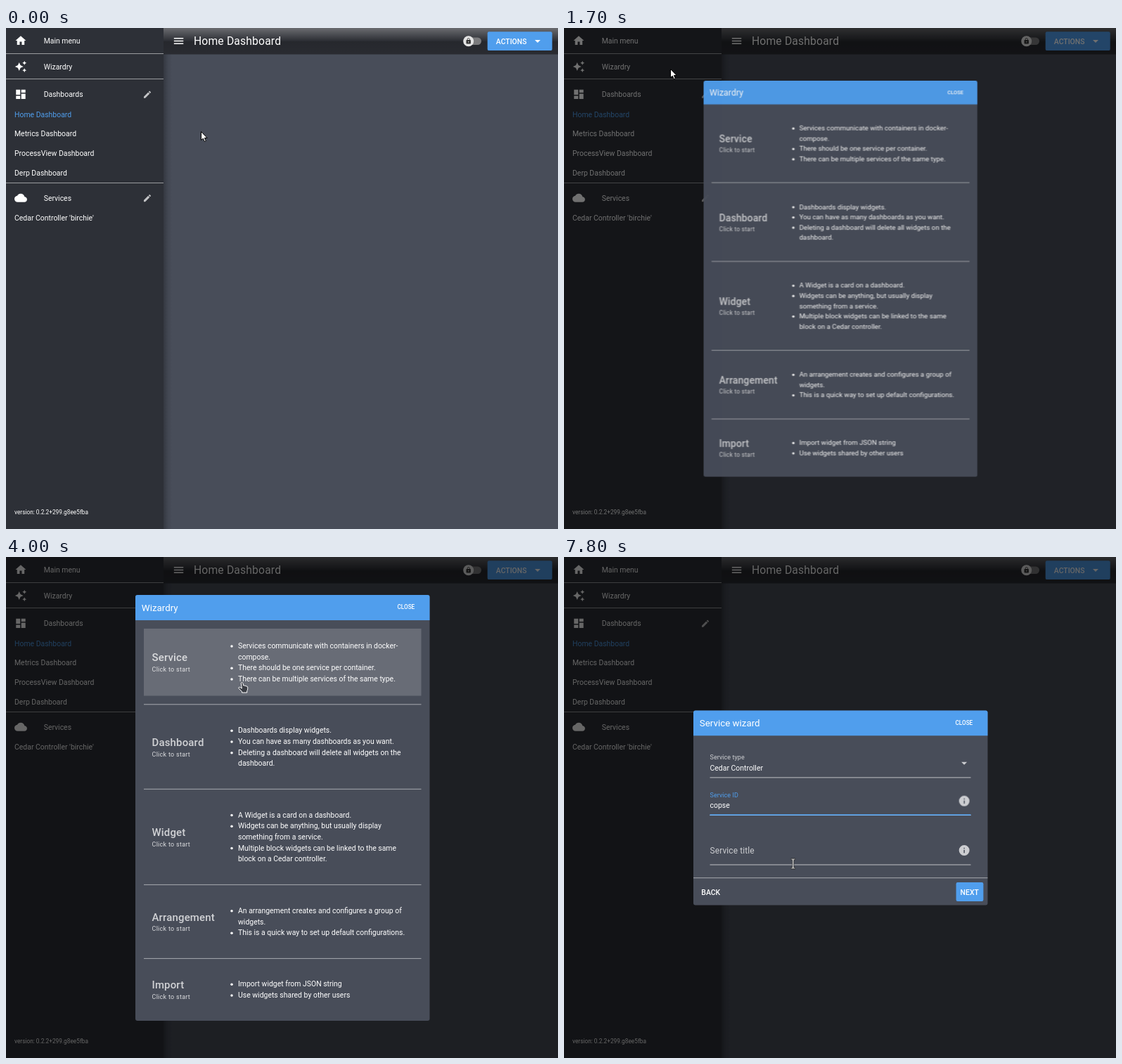
Animation of 785x713 px, one loop 8 s. Source, as an HTML page:

```html
<!DOCTYPE html>
<html lang="en">
<head>
<meta charset="utf-8">
<title>Service wizard</title>
<style>
html, body { margin: 0; width: 100%; height: 100%; overflow: hidden; background: #484d59; }
svg { display: block; width: 785px; height: 713px; font: 10.45px Roboto, sans-serif; fill: #fff; }
text { white-space: pre; }
.blue { fill: #509eed; }
.panel { fill: #484d59; }
.soft { opacity: .72; }
.medium { font-weight: 500; }
.rule { fill: none; stroke: #fff; stroke-opacity: .52; }
.field { fill: none; stroke: #fff; stroke-opacity: .65; }
.title { font-size: 15.7px; letter-spacing: .01em; }
.dialog-title { font-size: 13.35px; }
.close { font-size: 8.2px; font-weight: 500; }
.heading { font-size: 14.93px; font-weight: 500; letter-spacing: .0125em; opacity: .75; }
.hint { font-size: 8.96px; letter-spacing: .0333em; opacity: .8; }
.small { font-size: 8.96px; letter-spacing: .009em; }
.label { font-size: 11.95px; letter-spacing: .009em; }

/* Every change is a hard step on the same 8 s clock. */
.step { animation: 8s step-end infinite; }

#row-hover { animation-name: row-hover; opacity: 0; }
@keyframes row-hover { 7.5% { opacity: .08 } 8.75% { opacity: .15 } 18.75% { opacity: .07 } 20% { opacity: 0 } }

#backdrop { animation-name: backdrop; opacity: 0; }
@keyframes backdrop { 18.75% { opacity: .16 } 20% { opacity: .42 } 21.25% { opacity: .56 } 22.5% { opacity: .6 } }

#menu { animation-name: menu; opacity: 0; transform-origin: 393.25px 357px; }
@keyframes menu {
  18.75% { opacity: .15; transform: scale(.015) }
  20% { opacity: .81; transform: scale(.678) }
  21.25% { opacity: .96; transform: scale(.93) }
  22.5% { opacity: 1; transform: none }
  52.5% { opacity: 0; transform: none }
}
#hover-0 { animation-name: hover-service; opacity: 0; }
@keyframes hover-service { 42.5% { opacity: .18 } }
#hover-1 { animation-name: hover-dashboard; opacity: 0; }
@keyframes hover-dashboard { 35% { opacity: .02 } 36.25% { opacity: .18 } 42.5% { opacity: 0 } }

#form { animation-name: form; opacity: 0; }
@keyframes form { 52.5% { opacity: 1 } }
#id-line { animation-name: id-line; }
@keyframes id-line { 66.25% { stroke-opacity: 1 } }
#id-focus { animation-name: id-focus; transform: scaleX(0); transform-origin: 393px 367px; }
@keyframes id-focus { 70% { transform: scaleX(.7) } 75% { transform: none } }
#id-label { animation-name: id-label; transform: translate(207.5px, 351.3px); fill: #bfc1c5; }
@keyframes id-label {
  70% { transform: translate(207.5px, 345.6px) scale(.84); fill: #509eed }
  75% { transform: translate(207.5px, 342.3px) scale(.75); fill: #509eed }
}
.typed { opacity: 0; }
#typed-1 { animation-name: typed-1; }
#typed-2 { animation-name: typed-2; }
#typed-3 { animation-name: typed-3; }
@keyframes typed-1 { 86.25% { opacity: 1 } 87.5% { opacity: 0 } }
@keyframes typed-2 { 87.5% { opacity: 1 } 88.75% { opacity: 0 } }
@keyframes typed-3 { 88.75% { opacity: 1 } }
#caret { animation-name: caret; opacity: 0; }
@keyframes caret {
  70% { opacity: 1; transform: none }
  75% { opacity: 0; transform: none }
  80% { opacity: 1; transform: none }
  86.25% { opacity: 1; transform: translateX(11.4px) }
  87.5% { opacity: 1; transform: translateX(17.3px) }
  88.75% { opacity: 1; transform: translateX(28.3px) }
  97.5% { opacity: 0; transform: translateX(28.3px) }
}

#pointer { animation-name: pointer; transform: translate(277px, 147px); }
@keyframes pointer {
  3.75% { transform: translate(273px, 142px) }
  5% { transform: translate(255px, 120px) }
  6.25% { transform: translate(222px, 92px) }
  7.5% { transform: translate(187px, 70px) }
  8.75% { transform: translate(160px, 60px) }
  10% { transform: translate(151px, 58px) }
  28.75% { transform: translate(185px, 66px) }
  30% { transform: translate(228px, 80px) }
  35% { transform: translate(318px, 235px) }
  38.75% { transform: translate(322px, 220px) }
  40% { transform: translate(329px, 196px) }
  42.5% { transform: translate(336px, 178px) }
  63.75% { transform: translate(317px, 316px) }
  66.25% { transform: translate(325px, 355px) }
  97.5% { transform: translate(325.7px, 436.5px) }
}
#arrow { animation-name: arrow; }
@keyframes arrow { 35% { opacity: 0 } }
#hand { animation-name: hand; opacity: 0; }
@keyframes hand { 35% { opacity: 1 } 66.25% { opacity: 0 } }
#beam { animation-name: beam; opacity: 0; }
@keyframes beam { 66.25% { opacity: 1 } }
</style>
</head>
<body>
<svg viewBox="0 0 785 713">
  <defs>
    <linearGradient id="gloss" x2="0" y2="1">
      <stop stop-color="#fff" stop-opacity=".3"/>
      <stop offset=".5" stop-color="#fff" stop-opacity="0"/>
      <stop offset=".51" stop-opacity=".12"/>
      <stop offset="1" stop-opacity=".04"/>
    </linearGradient>
    <linearGradient id="shade">
      <stop stop-opacity=".27"/>
      <stop offset=".5" stop-opacity=".09"/>
      <stop offset="1" stop-opacity="0"/>
    </linearGradient>
    <path id="edit" d="M3 17.25V21h3.75L17.81 9.94l-3.75-3.75zM20.71 7.04c.39-.39.39-1.02 0-1.41l-2.34-2.34c-.39-.39-1.02-.39-1.41 0l-1.83 1.83 3.75 3.75z"/>
    <path id="down" d="M7 10l5 5 5-5z"/>
    <path id="info" d="M12 2a10 10 0 1 0 0 20a10 10 0 1 0 0-20zm1 15h-2v-6h2zm0-8h-2V7h2z" fill-rule="evenodd"/>
  </defs>

  <rect class="panel" width="785" height="713"/>
  <rect x="224" width="12" height="713" fill="url(#shade)"/>

  <g id="toolbar">
    <rect x="224" width="561" height="37.5" fill="#2b2d33"/>
    <rect x="224" width="561" height="37.5" fill="url(#gloss)"/>
    <path transform="translate(236.6 9.6) scale(.7467)" d="M3 18h18v-2H3zm0-5h18v-2H3zm0-7v2h18V6z"/>
    <text class="title" x="267" y="24.2">Home Dashboard</text>
    <rect x="653" y="13.5" width="23" height="10.4" rx="5.2" fill="#7b7b7d"/>
    <circle cx="657.7" cy="18.7" r="7.5" fill="#e4e4e4"/>
    <path transform="translate(652.9 13.8) scale(.4)" fill="#333" fill-rule="evenodd" d="M18 8h-1V6A5 5 0 0 0 7 6v2H6a2 2 0 0 0-2 2v10a2 2 0 0 0 2 2h12a2 2 0 0 0 2-2V10a2 2 0 0 0-2-2zm-6 9a2 2 0 1 1 0-4a2 2 0 0 1 0 4zm3.1-9H8.9V6a3.1 3.1 0 0 1 6.2 0z"/>
    <rect class="blue" x="684.7" y="5.3" width="92" height="26.8" rx="2.2"/>
    <text class="medium" x="696.8" y="22.5">ACTIONS</text>
    <use href="#down" transform="translate(746.4 9.1) scale(.8)"/>
  </g>

  <g id="drawer">
    <rect width="224" height="713" fill="#2d3037"/>
    <rect id="row-hover" class="step" y="37" width="224" height="35.5"/>
    <path class="rule" d="M0 36.5h224M0 72.5h224M0 220.5h224"/>
    <g transform="translate(12 9) scale(.7467)"><path d="M10 20v-6h4v6h5v-8h3L12 3 2 12h3v8z"/></g>
    <g transform="translate(12 46) scale(.7467)"><path d="M19 9l1.25-2.75L23 5l-2.75-1.25L19 1l-1.25 2.75L15 5l2.75 1.25zM11.5 9.5L9 4 6.5 9.5 1 12l5.5 2.5L9 20l2.5-5.5L17 12zM19 15l-1.25 2.75L15 19l2.75 1.25L19 23l1.25-2.75L23 19l-2.75-1.25z"/></g>
    <g transform="translate(12 85.4) scale(.7467)"><path d="M3 13h8V3H3zm0 8h8v-6H3zm10 0h8V11h-8zm0-18v6h8V3z"/></g>
    <g transform="translate(12 232.8) scale(.7467)"><path d="M19.35 10.04C18.67 6.59 15.64 4 12 4 9.11 4 6.6 5.64 5.35 8.04 2.34 8.36 0 10.91 0 14c0 3.31 2.69 6 6 6h13c2.76 0 5-2.24 5-5 0-2.64-2.05-4.78-4.65-4.96z"/></g>
    <use href="#edit" class="soft" transform="translate(194.3 88) scale(.56)"/>
    <use href="#edit" class="soft" transform="translate(194.3 235.4) scale(.56)"/>
    <text x="53.7" y="21.9">Main menu</text>
    <text x="53.7" y="58.6">Wizardry</text>
    <text x="53.7" y="98.2">Dashboards</text>
    <text class="blue" x="12" y="126.7">Home Dashboard</text>
    <text x="12" y="154.3">Metrics Dashboard</text>
    <text x="12" y="181.9">ProcessView Dashboard</text>
    <text x="12" y="209.6">Derp Dashboard</text>
    <text x="53.7" y="245.6">Services</text>
    <text x="12" y="274">Cedar Controller 'birchie'</text>
    <text x="12" y="692" font-size="8.3">version: 0.2.2+299.g8ee5fba</text>
  </g>

  <rect id="backdrop" class="step" width="785" height="713" fill="#000"/>

  <g id="menu" class="step">
    <rect class="panel" x="184" y="54" width="418.5" height="606" rx="3"/>
    <path class="blue" d="M184 90V57q0-3 3-3h412.500q3 0 3 3v33z"/>
    <text class="dialog-title" x="192.800" y="76.900">Wizardry</text>
    <text class="close" x="556.500" y="74.400">CLOSE</text>
    <path class="rule" d="M196 209.800h394.500M196 330.300h394.500M196 466.400h394.500M196 571.400h394.500"/>
  </g>

  <g id="form" class="step">
    <rect class="panel" x="184" y="218.500" width="418.500" height="277" rx="3"/>
    <path class="blue" d="M184 254.300v-32.800q0-3 3-3h412.500q3 0 3 3v32.800z"/>
    <text class="dialog-title" x="192.800" y="241.200">Service wizard</text>
    <text class="close" x="556.500" y="238.900">CLOSE</text>
    <text class="small soft" x="207.500" y="288.300">Service type</text>
    <text x="207.500" y="303.900">Cedar Controller</text>
    <use href="#down" class="soft" transform="translate(559.500 283.800) scale(.8)"/>
    <path class="field" d="M207.500 313.900h371M207.500 438h371"/>
    <path id="id-line" class="field step" d="M207.500 367.400h371"/>
    <rect id="id-focus" class="blue step" x="207.500" y="366.200" width="371" height="1.600"/>
    <text id="id-label" class="label step">Service ID</text>
    <text id="typed-1" class="typed step" x="207.500" y="357.200">co</text>
    <text id="typed-2" class="typed step" x="207.500" y="357.200">cop</text>
    <text id="typed-3" class="typed step" x="207.500" y="357.200">copse</text>
    <rect id="caret" class="step" x="208" y="347" width="1" height="12"/>
    <use href="#info" class="soft" transform="translate(560.200 338.200) scale(.7467)"/>
    <text class="label soft" x="207.500" y="421.500">Service title</text>
    <use href="#info" class="soft" transform="translate(560.200 408.500) scale(.7467)"/>
    <path class="rule" d="M184 456.700h418.500"/>
    <text class="medium" x="195.300" y="480.500">BACK</text>
    <rect class="blue" x="557.600" y="463" width="38.800" height="26.900" rx="2.200"/>
    <text class="medium" x="563.600" y="480.500">NEXT</text>
  </g>

  <g id="pointer" class="step">
    <path id="arrow" class="step" d="M.5.5V12.600L3.300 10.200l2 4.400 2-.9-1.900-4.200h3.700z" stroke="#000"/>
    <path id="hand" class="step" fill="#3b3e45" stroke="#fff" stroke-linejoin="round" d="M-1.700 1.700C-1.800.2.500.1.800 1.500L1.700 5q1.300-.7 2.200.4 1.300-.5 2 .6 1.600-.2 1.800 1.300v2.400q0 1.700-1 2.800V15H-.5v-1.600L-4.800 9.200q-1-1.300.2-1.900 1-.4 2.200.7l1.700 1.100z"/>
    <g id="beam" class="step" fill="none" stroke-linecap="round">
      <path id="beam-shape" stroke="#222" stroke-width="2.400" d="M-2-6.500Q0-6.500 0-5V5Q0 6.500-2 6.500M2-6.500Q0-6.500 0-5V5Q0 6.500 2 6.500"/>
      <use href="#beam-shape" style="stroke:#fff"/>
      <path stroke="#fff" stroke-width="1.200" d="M-2-6.500Q0-6.500 0-5V5Q0 6.500-2 6.500M2-6.500Q0-6.500 0-5V5Q0 6.500 2 6.500"/>
    </g>
  </g>
</svg>
<script>
const lineHeight = 15.68;
// Lines that start with * open a new bullet.
const entries = [
  ['Service', 149.7, ['*Services communicate with containers in docker-', 'compose.',
    '*There should be one service per container.', '*There can be multiple services of the same type.']],
  ['Dashboard', 270.1, ['*Dashboards display widgets.', '*You can have as many dashboards as you want.',
    '*Deleting a dashboard will delete all widgets on the', 'dashboard.']],
  ['Widget', 398.2, ['*A Widget is a card on a dashboard.', '*Widgets can be anything, but usually display',
    'something from a service.', '*Multiple block widgets can be linked to the same', 'block on a Cedar controller.']],
  ['Arrangement', 518.8, ['*An arrangement creates and configures a group of', 'widgets.',
    '*This is a quick way to set up default configurations.']],
  ['Import', 615.4, ['*Import widget from JSON string', '*Use widgets shared by other users']],
];
const menu = document.getElementById('menu');

function add(tag, attrs, text = '') {
  const node = document.createElementNS('http://www.w3.org/2000/svg', tag);
  for (const [key, value] of Object.entries(attrs)) node.setAttribute(key, value);
  node.textContent = text;
  menu.append(node);
}

entries.forEach(([name, middle, lines], i) => {
  if (i < 2) add('rect', { id: 'hover-' + i, class: 'step', x: 196, y: middle - 47.8, width: 394.5, height: 95.6 });
  add('text', { class: 'heading', x: 207.5, y: middle - 1.3 }, name);
  add('text', { class: 'hint', x: 207.5, y: middle + 13.6 }, 'Click to start');
  lines.forEach((line, n) => {
    const y = middle + (n - (lines.length - 1) / 2) * lineHeight;
    if (line[0] === '*') add('circle', { cx: 321, cy: y + .7, r: 1.75 });
    add('text', { x: 330, y: y + 3.7 }, line.replace('*', ''));
  });
});
</script>
</body>
</html>
```
